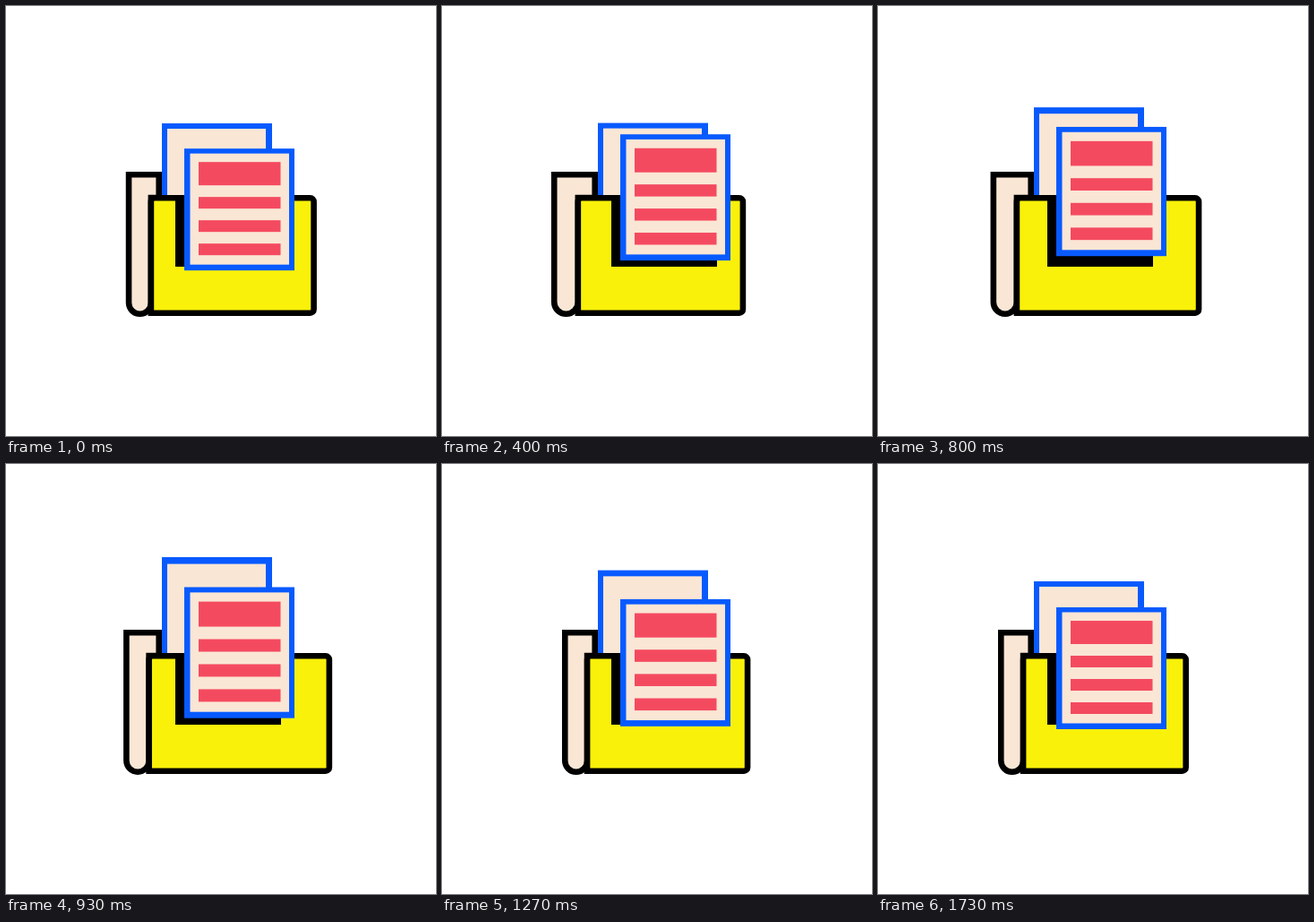
Write an HTML page with a canvas that moves like this. It is 480 px wide and 480 px high and loops after 1.99 s.

```html
<!DOCTYPE html>
<html>
<head>
<meta charset="utf-8">
<style>
html, body { margin: 0; width: 100%; height: 100%; overflow: hidden; background: #fff; }
canvas { display: block; }
</style>
</head>
<body>
<canvas id="stage" width="480" height="480"></canvas>
<script>
const ctx = document.getElementById('stage').getContext('2d');
const LOOP = 1990, FPS = 15, LAST = 26;
const BLACK = '#000', YELLOW = '#faf10a', CREAM = '#fae6d5', BLUE = '#085aff', RED = '#f44a60';
const LINE = 6.6, HALF = LINE / 2;

// A smooth push that is strongest at its peak and dies away on both sides.
const push = (step, peak, spread, amount) =>
  amount * Math.exp(-(((step - peak) / spread) ** 2) / 2);

function pose(step) {
  const p = (...args) => push(step, ...args);
  const left = 134 + p(8.5, 2.9, -17.5);
  const frontTop = 160 + p(5, 2, -19) + p(12.7, 1.1, -27) + p(16.5, 2.5, -15);
  return {
    left,
    fold: left + 24.8 + (134 - left) * .15,
    right: 347 + p(6.5, 2.2, -8) + p(13.2, 1.6, 19.5) + p(20, 2, -3),
    backTop: 131 + p(15, 3.1, -28.5),
    frontTop,
    frontHeight: 136 + p(9, 2.5, 10) + p(16, 2.5, 12.2),
  };
}

function box(color, x0, y0, x1, y1) {
  ctx.fillStyle = color;
  ctx.fillRect(x0, y0, x1 - x0, y1 - y0);
}

function outline(fill) {
  ctx.fillStyle = fill;
  ctx.strokeStyle = BLACK;
  ctx.lineWidth = LINE;
  ctx.fill();
  ctx.stroke();
}

function drawSpine(left, fold) {
  const x0 = left + HALF, x1 = fold + HALF, r = (x1 - x0) / 2;
  ctx.beginPath();
  ctx.moveTo(x0, 185 + HALF);
  ctx.lineTo(174 - HALF, 185 + HALF);
  ctx.lineTo(174 - HALF, 214);
  ctx.lineTo(x1, 214);
  ctx.arc(x0 + r, 347 - HALF - r, r, 0, Math.PI);
  ctx.closePath();
  outline(CREAM);
}

function drawBackSheet(top) {
  box(BLUE, 174, top, 297, 212);
  box(CREAM, 180, top + 6 + (131 - top) * .06, 290, 212);
}

function drawCover(fold, right) {
  ctx.beginPath();
  ctx.roundRect(fold + HALF, 211 + HALF, right - fold - LINE, 135 - LINE, [4, 4, 4, 0]);
  outline(YELLOW);
  box(BLACK, 189, 211, 307, 291);
}

function drawFrontSheet(top, height) {
  const y = v => top + v * height / 136;
  box(BLUE, 199, top, 322, top + height);
  box(CREAM, 205.5, y(5.5), 316, y(129.5));
  box(RED, 215, y(15), 306.5, y(41));
  for (let v = 54; v < 110; v += 26) box(RED, 215, y(v), 306.5, y(v + 13));
}

function draw(now) {
  const step = Math.min(LAST, Math.floor((now % LOOP + 4) * FPS / 1000));
  const { left, fold, right, backTop, frontTop, frontHeight } = pose(step);
  box('#fff', 0, 0, 480, 480);
  drawSpine(left, fold);
  drawBackSheet(backTop);
  drawCover(fold, right);
  drawFrontSheet(frontTop, frontHeight);
}

let start;
function tick(now) {
  start ??= now;
  draw(now - start);
  requestAnimationFrame(tick);
}
requestAnimationFrame(tick);
</script>
</body>
</html>
```
